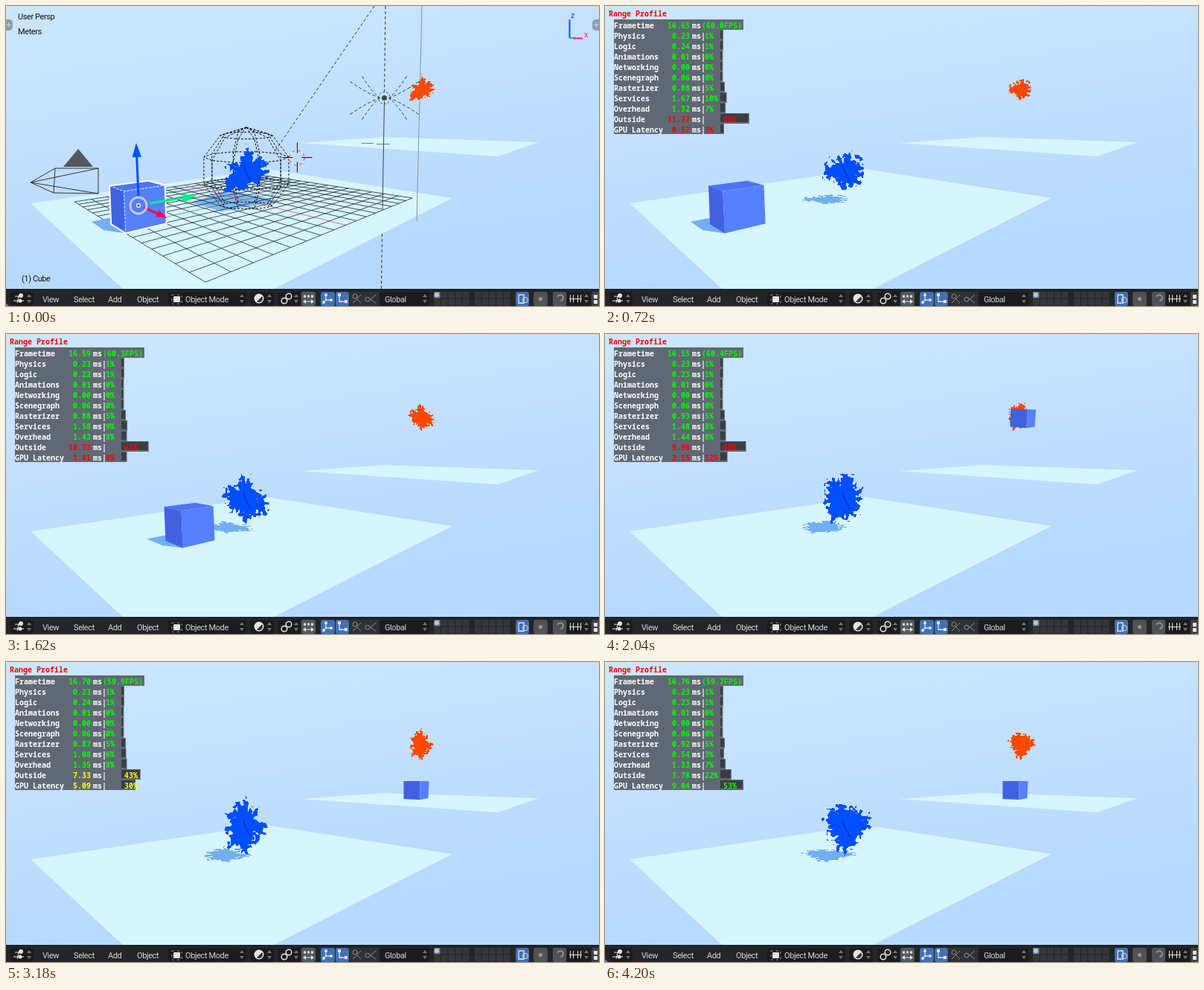
Recreate the animation shown at these times as an HTML page with a canvas. Size 797 px wide and 403 px high, loop 4.26 s.

```html
<!DOCTYPE html>
<html lang="en">
<head>
<meta charset="utf-8">
<title>Portal scene</title>
<style>
html, body { margin: 0; width: 100%; height: 100%; overflow: hidden; background: #bfdfff; }
canvas { display: block; }
</style>
</head>
<body>
<canvas id="stage" width="797" height="403"></canvas>
<script>
const ctx = document.getElementById('stage').getContext('2d');
const LOOP = 4260, STEP = 60, GAME_START = 360, GAME_END = 4200;
const PUSH = 1360, TELEPORT = 1920, FALL_TIME = 865;
const SANS = '11px Roboto, sans-serif', MONO = '600 10px "Noto Sans Mono", monospace';

const lerp = (a, b, k) => a + (b - a) * k;
const clamp01 = v => Math.max(0, Math.min(1, v));
const range = n => [...Array(n).keys()];

// Drawing helpers
function path(pts, close) {
  ctx.beginPath();
  for (let i = 0; i < pts.length; i += 2) ctx.lineTo(pts[i], pts[i + 1]);
  if (close) ctx.closePath();
}
function poly(pts, fill) {
  path(pts, true);
  ctx.fillStyle = fill;
  ctx.fill();
}
function stroke(color, width = 1, dash = []) {
  ctx.strokeStyle = color;
  ctx.lineWidth = width;
  ctx.setLineDash(dash);
  ctx.stroke();
}
function line(pts, color, width, dash) {
  path(pts, false);
  stroke(color, width, dash);
}
function outline(pts, color, width, dash) {
  path(pts, true);
  stroke(color, width, dash);
}
function rect(x, y, w, h, fill, r = 0) {
  ctx.fillStyle = fill;
  ctx.beginPath();
  ctx.roundRect(x, y, w, h, r);
  ctx.fill();
}
function arc(x, y, r, from = 0, to = 2 * Math.PI) {
  ctx.beginPath();
  ctx.arc(x, y, r, from, to);
}
function disc(x, y, r, fill) {
  arc(x, y, r);
  ctx.fillStyle = fill;
  ctx.fill();
}
function ring(x, y, r, color, width, dash) {
  arc(x, y, r);
  stroke(color, width, dash);
}
function text(str, x, y, color, font = SANS, align = 'left') {
  ctx.font = font;
  ctx.letterSpacing = font === SANS ? '-0.4px' : '0px';
  ctx.textAlign = align;
  ctx.fillStyle = color;
  ctx.fillText(str, x, y);
}

// Seeded value noise
function hash(x, y, seed) {
  const v = Math.sin(x * 127.1 + y * 311.7 + seed * 74.7) * 43758.5453;
  return v - Math.floor(v);
}
function noise(x, y, seed) {
  const ix = Math.floor(x), iy = Math.floor(y), fx = x - ix, fy = y - iy;
  return lerp(lerp(hash(ix, iy, seed), hash(ix + 1, iy, seed), fx),
              lerp(hash(ix, iy + 1, seed), hash(ix + 1, iy + 1, seed), fx), fy);
}

// A ragged cloud: broad lobes, radial spikes and small clumps on its edge
function cloud(cx, cy, sx, sy, seed, fill) {
  ctx.fillStyle = fill;
  const w = Math.ceil(42 * sx), h = Math.ceil(42 * sy);
  for (let y = -h; y < h; y++) {
    for (let x = -w; x < w; x++) {
      const u = x / sx, v = y / sy, r = Math.hypot(u, v) || 1;
      const lobe = noise(1.4 * u / r, 1.4 * v / r, seed);
      const spike = noise(6 * u / r, 6 * v / r, seed + 5) - .5;
      const clump = noise(u / 3, v / 3, seed + 9) - .5;
      if (r < 15 + 20 * lobe + 14 * spike + 16 * clump) ctx.fillRect(cx + x, cy + y, 1, 1);
    }
  }
}

// Maps the unit square onto the floor grid in perspective, w being the depth
const GRID = [[92, 263], [268, 371], [546, 258], [336, 226]];
const floor = (([x0, y0], [x1, y1], [x2, y2], [x3, y3]) => {
  const ax = x1 - x2, bx = x3 - x2, ay = y1 - y2, by = y3 - y2;
  const cx = x0 - x1 + x2 - x3, cy = y0 - y1 + y2 - y3;
  const d = ax * by - bx * ay, g = (cx * by - bx * cy) / d, h = (ax * cy - cx * ay) / d;
  return (u, v, height = 0) => {
    const w = g * u + h * v + 1;
    return [((x1 - x0 + g * x1) * u + (x3 - x0 + h * x3) * v + x0 - 40 * height * .04) / w,
            ((y1 - y0 + g * y1) * u + (y3 - y0 + h * y3) * v + y0 - 39.5 * height) / w];
  };
})(...GRID);

// Scene
function world() {
  const sky = ctx.createLinearGradient(0, 0, 60, 380);
  sky.addColorStop(0, '#cbe7fd');
  sky.addColorStop(.45, '#c3e0ff');
  sky.addColorStop(1, '#b7d9ff');
  ctx.fillStyle = sky;
  ctx.fillRect(0, 0, 797, 380);
  poly([395, 184, 508, 176, 716, 183, 661, 202], '#d6f5ff');
  poly([33, 265, 350, 219, 600, 258, 360, 380, 157, 380], '#d6f5ff');
}

// The cube is two grid cells wide and slides along v
const CUBE = { near: .573, far: .448, side: .125 };
function cubeCorners(v) {
  const { near, far, side } = CUBE, at = h => ({
    left: floor(far, v, h), back: floor(far, v + side, h),
    right: floor(near, v + side, h), front: floor(near, v, h)
  });
  return { top: at(1), base: at(0) };
}
function nearCube(v) {
  const { near, far, side } = CUBE, { top, base } = cubeCorners(v);
  const shade = (u, w) => floor(u - .077, w - .035);
  poly([shade(near, v), shade(far, v), shade(far, v + side), base.back, base.right, base.front].flat(), '#72aef2');
  poly([top.left, top.back, top.right, top.front].flat(), '#4c74f5');
  poly([top.left, top.front, base.front, base.left].flat(), '#4062e2');
  poly([top.front, top.right, base.right, base.front].flat(), '#5580ff');
}
function farCube(t) {
  const age = t - TELEPORT, fall = Math.min(1, age / FALL_TIME);
  const settle = clamp01((age - FALL_TIME) / 250);
  ctx.save();
  ctx.translate(lerp(562 - 7 * fall * fall, 551.5, settle), 112 + 60 * fall * fall);
  ctx.rotate(.09 * Math.min(1, 1.4 * fall) * (1 - settle));
  poly([-17, -12, 5, -12, 5, 13, -17, 12], '#4062e2');
  poly([5, -12, 17, -12, 16, 11, 5, 13], '#5580ff');
  ctx.restore();
}
function portals(seed) {
  cloud(558, 111, .55, .55, seed, '#ff4800');
  cloud(322, 221, 1, 1, seed, '#004fff');
  line([319, 213, 323, 224, 329, 235], '#0036dc', 2);
}

// Profiler: each row eases from its first reading to its last, in ms
const ROWS = [
  ['Frametime', 16.58, 16.7], ['Physics', .22, .22], ['Logic', .23, .23], ['Animations', .01, .01],
  ['Networking', 0, 0], ['Scenegraph', .06, .06], ['Rasterizer', .92, .92], ['Services', 1.69, .54],
  ['Overhead', 1.4, 1.4], ['Outside', 11.5, 3.77], ['GPU Latency', .5, 9.07]
];
const PANEL = '#5f6873', GREEN = '#00ff00', YELLOW = '#ffff00', RED = '#ff0000';
function rowColor(name, progress) {
  if (name === 'Outside') return progress < .65 ? RED : progress < .85 ? YELLOW : GREEN;
  if (name === 'GPU Latency') return progress < .45 ? RED : progress < .85 ? YELLOW : GREEN;
  return GREEN;
}
function profiler(t) {
  const progress = (t - GAME_START) / (GAME_END - GAME_START);
  text('Range Profile', 5, 14, RED, MONO);
  rect(12, 18, 174, 14, PANEL);
  rect(12, 32, 144, 140, PANEL);
  let frametime;
  ROWS.forEach(([name, first, last], i) => {
    const y = 30 + 14 * i, color = rowColor(name, progress);
    const jitter = (hash(i, t / STEP, 3) - .5) * (first === last ? .12 : .012);
    const ms = lerp(first, last, progress ** 2) * (1 + jitter);
    text(name, 12, y, '#fff', MONO);
    text(ms.toFixed(2), 114, y, color, MONO, 'right');
    text('ms', 117, y, '#fff', MONO);
    if (i === 0) {
      frametime = ms;
      text(`(${(1000 / ms).toFixed(1)}FPS)`, 130, y, color, MONO);
      return;
    }
    const pct = Math.floor(ms / frametime * 100), width = 3.4 + .52 * pct;
    rect(155, y - 12, width, 14, PANEL);
    rect(155, y - 11, width - 1, 11, '#3a3e44');
    text('|', 129, y, '#fff', MONO);
    text(pct + '%', pct > 25 ? 159 : 134, y, color, MONO);
  });
}

// Editor overlays
function grid() {
  for (const i of range(17)) {
    const k = i / 16, middle = i === 8;
    line([...floor(k, 0), ...floor(k, 1)], middle ? '#3c8c60' : '#20282c', .8);
    line([...floor(0, k), ...floor(1, k)], middle ? '#e0407c' : '#20282c', .8);
  }
}
function wireSphere() {
  const point = (lat, i) => {
    const a = lat * Math.PI / 5, b = i * Math.PI / 5;
    return [323 + 60 * Math.sin(a) * Math.cos(b), 221 - 58 * Math.cos(a) + 8 * Math.sin(a) * Math.sin(b)];
  };
  for (const lat of [1, 2, 3, 4]) outline(range(10).flatMap(i => point(lat, i)), '#111', 1, [3, 2]);
  for (const i of range(10)) line(range(5).flatMap(lat => point(lat, i)), '#111', 1, [3, 2]);
}
function lamp() {
  const x = 508.5, y = 123.5, dash = [4, 3];
  line([495, 0, 360, 197], '#333', 1, dash);
  line([510, 0, x, y - 5], '#333', 1, dash);
  line([x, y + 5, 506, 272], '#444');
  line([505.5, 306, 504.5, 380], '#333', 1, dash);
  line([559, 0, 552, 289], '#8793a0');
  for (const side of [-1, 1]) {
    for (const rise of [-1, 1]) {
      for (const reach of [30, 46]) {
        ctx.beginPath();
        ctx.moveTo(x + side * reach, y + rise * (reach === 30 ? 29 : 22));
        ctx.quadraticCurveTo(x + side * reach / 2, y + rise * 6, x + side * 6, y);
        stroke('#333', 1, dash);
      }
    }
  }
  ring(x, y, 8, '#444', 1, [3, 2]);
  disc(x, y, 3.5, '#444');
}
function camera() {
  const frame = [66, 218, 124, 218, 124, 252, 64, 251];
  poly([77, 216, 97, 192, 117, 216], '#55585c');
  outline(frame, '#333');
  for (const i of range(4)) line([33, 237, frame[2 * i], frame[2 * i + 1]], '#333');
}
function arrow(x0, y0, x1, y1, color, size) {
  ctx.save();
  ctx.translate(x1, y1);
  ctx.rotate(Math.atan2(y1 - y0, x1 - x0));
  line([-Math.hypot(x1 - x0, y1 - y0), 0, -size, 0], color, 3);
  poly([0, 0, -size, -size * .33, -size, size * .33], color);
  ctx.restore();
}
function selection() {
  const { top, base } = cubeCorners(0);
  outline([top.left, top.back, top.right, base.right, base.front, base.left].flat(), '#fff', 2);
  line([top.left, top.front, top.right].flat(), '#e6edff', 1, [3, 2]);
  line([top.front, base.front].flat(), '#e6edff', 1, [3, 2]);
  arrow(178, 256, 175, 184, '#0050ff', 19);
  arrow(193, 265, 256, 255, '#00f080', 18);
  arrow(186, 271, 217, 285, '#ff0055', 15);
  ring(178, 268, 11, '#c4c8d4', 3);
  disc(178, 268, 3, '#fff');
  disc(178, 268, 1.6, '#334');
}
function cursor3d() {
  ring(391, 204, 10, '#fff');
  ring(391, 204, 10, '#f02020', 1, [4, 4]);
  for (const [dx, dy] of [[1, 0], [-1, 0], [0, 1], [0, -1]]) {
    line([391.5 + dx * 6, 203.5 + dy * 6, 391.5 + dx * 20, 203.5 + dy * 20], '#111');
  }
  line([478, 184.5, 494, 184.5], '#3d8cff');
  line([498, 185.5, 516, 185.5], '#5c7890');
}
function labels() {
  text('User Persp', 16, 18, '#111');
  text('Meters', 16, 38, '#111');
  text('(1) Cube', 21, 370, '#111');
  line([757.5, 18, 757.5, 43], '#1048ff', 2);
  line([757, 43, 766, 43], '#00c87c', 2);
  line([762, 43.5, 775, 43.5], '#ff2060', 2);
  text('z', 759, 16, '#1048ff');
  text('x', 777, 42, '#ff2060');
  for (const x of [-5, 788]) {
    rect(x, 18, 14, 15, '#909dac', 5);
    text('+', x < 0 ? 3.5 : 793.5, 29, '#d5dde6', SANS, 'center');
  }
}
function editor() {
  poly([247, 264, 300, 247, 368, 262, 290, 276], '#7fbaf4');
  grid();
  nearCube(0);
  lamp();
  camera();
  wireSphere();
  portals(GAME_START / STEP);
  cursor3d();
  selection();
  labels();
}

// Header bar
const WHITE = '#e6e6e6', DIM = '#8b8d90', BLUE = '#4170b4', GRAY = '#505254';
const button = (x, w, fill) => rect(x, 384, w, 19, fill, 3);
function field(x, w) {
  button(x, w, '#1a1c1e');
  const mid = x + w - 6;
  for (const s of [-1, 1]) poly([mid - 3, 393 + 2 * s, mid, 393 + 6 * s, mid + 3, 393 + 2 * s], '#777');
}
function layers(x) {
  for (const i of range(10)) rect(x + (i % 5) * 9.7, 384 + Math.floor(i / 5) * 9.5, 8.7, 8.5, '#353739', 1);
}
function modeIcons() {
  line([10, 396, 24, 396], WHITE);
  line([12, 390, 17, 390, 15, 399], WHITE);
  disc(20, 389, 3, WHITE);
  disc(19, 396, 2.5, WHITE);
  outline([223, 388, 236, 388, 236, 400, 223, 400], '#999', 1, [3, 4]);
  rect(225, 390, 9, 8, WHITE, 1);
  disc(340, 393, 6.5, WHITE);
  arc(340, 393, 5, -.6, 2.2);
  ctx.fillStyle = '#333';
  ctx.fill();
  ring(374, 396, 3.8, WHITE, 1.5);
  ring(380, 390, 3.8, WHITE, 1.5);
}
function transformIcons() {
  button(397, 19, '#55585a');
  line([400, 390, 413, 390], WHITE, 3, [3, 2]);
  line([400, 397, 413, 397], WHITE);
  for (const s of [-1, 1]) poly([406.5 + 7.5 * s, 397, 406.5 + 3.5 * s, 394, 406.5 + 3.5 * s, 400], WHITE);
  button(423, 19, BLUE);
  button(443, 18, BLUE);
  line([430, 387, 430, 395, 438, 395], WHITE, 1.3);
  line([430, 395, 426, 399], WHITE, 1.3);
  for (const [x, y] of [[430, 388], [437, 395], [427, 398]]) disc(x, y, 2, WHITE);
  line([448, 387, 448, 397, 458, 397], WHITE, 1.3);
  rect(446, 386, 4, 4, WHITE);
  rect(455, 395, 4, 4, WHITE);
  button(462, 39, '#303234');
  ring(469, 390, 3, DIM);
  line([466, 399, 477, 388], DIM);
  line([471, 393, 477, 399], DIM);
  line([497, 388, 490, 394, 497, 399], DIM);
  ring(486, 394, 3, DIM);
}
function snapIcons() {
  button(685, 18, BLUE);
  outline([689, 388, 696, 388, 696, 399, 689, 399], WHITE, 1.3);
  ring(698, 395, 3.5, WHITE);
  button(709, 19, GRAY);
  disc(718.5, 393.5, 2.5, '#999');
  button(735, 18, GRAY);
  arc(745, 392, 4, -2.8, 1.5);
  stroke(DIM, 2);
  field(754, 32);
  for (const x of [758.5, 762.5, 768.5, 772.5]) line([x, 388, x, 398], WHITE);
  line([757, 393.5, 774, 393.5], WHITE);
  button(787, 12, '#404244');
  for (const y of [388, 395]) rect(790, y, 5, 5, WHITE);
}
function header() {
  rect(0, 380, 797, 23, '#232527');
  rect(0, 380, 797, 1, '#151617');
  for (const [x, w] of [[6, 31], [218, 105], [329, 31], [366, 30], [503, 66]]) field(x, w);
  const names = { View: 49, Select: 91, Add: 137, Object: 176, 'Object Mode': 241, Global: 509 };
  for (const [name, x] of Object.entries(names)) text(name, x, 398, '#d5d5d5');
  modeIcons();
  transformIcons();
  layers(575);
  layers(630);
  rect(575, 384, 8.7, 8.5, '#77797c', 1);
  disc(579, 388, 3, '#a8d0ff');
  snapIcons();
}

function draw(t) {
  world();
  if (t < GAME_START) {
    editor();
  } else {
    const seed = t / STEP;
    cloud(297, 259, 1.1, .25, seed, '#72aef2');
    if (t < TELEPORT) nearCube(Math.max(0, t - PUSH) * .0007);
    portals(seed);
    if (t >= TELEPORT) farCube(t);
    profiler(t);
  }
  header();
  if (t >= 4140 || t < 180) poly([0, 399, 4, 403, 0, 403], '#4a7fd0');
}

const start = performance.now();
let shown = -1;
function tick() {
  const t = Math.floor((performance.now() - start) % LOOP / STEP) * STEP;
  if (t !== shown) draw(shown = t);
  requestAnimationFrame(tick);
}
tick();
</script>
</body>
</html>
```
